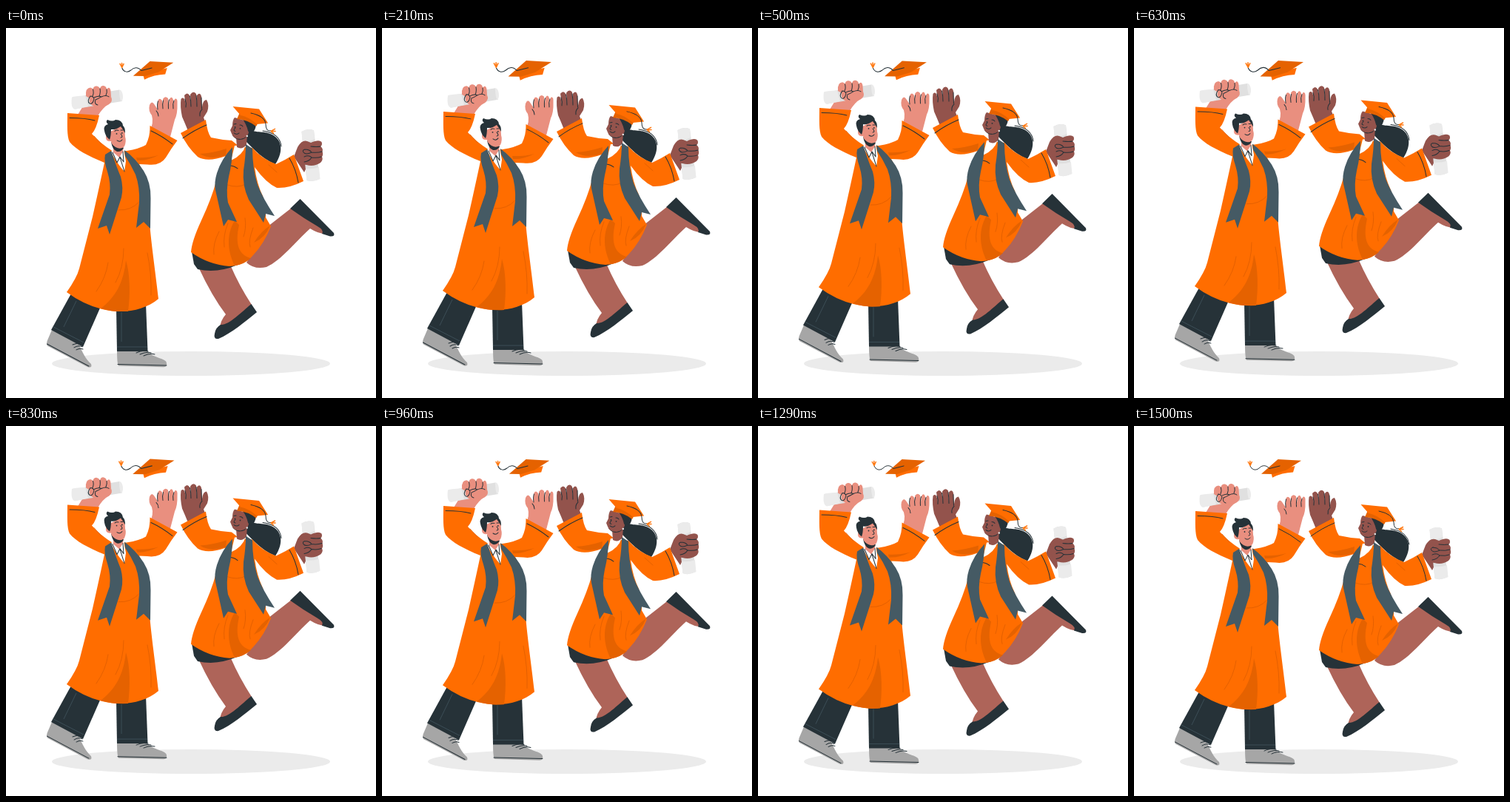
An HTML page that plays this animation: 500x500 px, repeating every 1.54 s.

```html
<!DOCTYPE html>
<html lang="en">
<head>
<meta charset="utf-8">
<title>Graduation high five</title>
<style>
html, body { margin: 0; width: 100%; height: 100%; overflow: hidden; background: #fff; }
svg { display: block; width: 100vw; height: 100vh; }
.o { fill: #ff6d00; }
.d { fill: #e56200; }
.s { fill: #455a64; }
.k { fill: #263238; }
.g { fill: #a6a6a6; }
.p { fill: #e0e0e0; }
.q { fill: #ebebeb; }
.w { fill: #fff; }
.m { fill: #e98f7f; }
.b { fill: #ae6459; }
.h { fill: #93534c; }
.line { fill: none; stroke: #263238; stroke-width: 1; stroke-linecap: round; stroke-linejoin: round; }
.fold { fill: none; stroke: #dd5e00; stroke-width: .8; stroke-linecap: round; }
.seam { fill: none; stroke: #455a64; stroke-width: .7; }
.tassel { fill: none; stroke: #ff7a14; stroke-width: 1.5; stroke-linecap: round; }
</style>
</head>
<body>
<svg viewBox="0 0 500 500">
  <ellipse class="q" cx="250" cy="453.5" rx="188" ry="16.6"/>

  <g id="cap">
    <path class="o" d="M185 62L187 69.7Q200 63 215 62.5L217.5 54Z"/>
    <path class="d" d="M172 64.8L194.5 45L226 46.8L206 59.5L188 65Z"/>
    <path class="line" d="M197 54L183 57.5C178 52 173 53 169 57C164 61 159 59 157 54"/>
    <path class="tassel" d="M157 53.5L154.3 48.5M157 53.5L156.8 47.5M157 53.5L159.3 48.5"/>
  </g>

  <g id="people">
    <g id="man">
      <path class="g" d="M62 408L98 426C103 438 108 448 115 454Q117 460 110 458L56 429.5Q54 427 56 422Z"/>
      <path class="g" d="M150 435L189 435C197 445 213 446 216.500 451Q219 458 213 458.200L152 456.500Q150 454 150 435Z"/>
      <path class="line" stroke-width=".6" d="M55.500 427L112 457M151 454.500L217 456"/>
      <path class="line" d="M90 428Q97 425 101 427M92 432Q98 428 103 431M95 435Q100 432 104 434M176 439Q184 435 192 437M181 441Q190 437 196 439M186 443Q194 439 201 441"/>
      <path class="k" d="M88 359L129 374L104 431L61 408Z"/>
      <path class="k" d="M149 378L189 372L191.500 437L150 437Z"/>
      <path class="seam" d="M64 404L105 425M95 369L78 404M150 431L191 431M156 384L156 424"/>

      <path class="m" d="M97 117L107 101L112 94L140 92Q146 98 139 103Q131 107 124 119Z"/>
      <path class="p" d="M90 94L153 83.500L157 99L93 109.500Z"/>
      <path class="q" d="M89 93.500Q92 92 107 91.500L111 106L93 110Q87 108 89 93.500Z"/>
      <path class="q" d="M153 83.500C158 83 160 97 155.500 99.300Q153 94 153 83.500Z"/>
      <path class="m" d="M108 92Q107 81 114 80.500Q117 81 117.500 83Q118 78 123 78.500Q126 79 127 82Q128 77.500 132 78Q136 79 136 83Q140 78 141.500 85L142 93Q145 99 139 103Q128 108 119 106Q111 102 113 95Z"/>
      <path class="line" d="M117.500 83Q119 88 117 92M127 82Q128 88 126 92M136 83Q137 87 135 91M114 92Q109 99 113 102Q117 104 119 96Q118 92 114 92M119 94Q125 91 129 93Q124 96 121 97M121 97Q119 103 124 104M129 93Q135 90 139 93"/>

      <path class="m" d="M194 140Q200 128 197 118Q192 112 194 104Q197 97 201 104L205 110L205 99Q207 93 211 98L212 104L212 96Q215 91 219 95L220 104L221 96Q224 91 226 97L226 104L228 96Q232 94 231.500 102Q232 116 228 124L222 147Z"/>
      <path class="line" d="M205 110Q204 103 205.500 99M212 109Q211 103 212.500 98M219.500 109Q219 101 220.500 97M226 109Q225 103 227 98M203 112Q206 115 206 119"/>

      <path class="o" d="M83 115L126 118Q122 137 116 143Q126 155 145 167L163 166Q181 163 189 158Q195 146 194.500 132L231.500 152Q223 163 216 175Q208 187 191 184.500L180 184C192 205 193 232 194 262C196 290 202 330 206 366C187 382 157 387 130 380Q105 374 82 357Q96 337 99 325L117 255Q126 215 133 182C111 173 94 164 86 154C82 146 83 130 83 115Z"/>
      <path class="d" d="M162 314C168 333 168 362 165 383Q144 384 128 379C148 364 159 344 162 314Z"/>
      <path class="d" d="M176 175Q190 176 206 172Q190 180 177 179Z"/>
      <path class="line" d="M86 121.500Q107 121.500 120 125M196 139Q211 146 225 157"/>
      <path class="fold" d="M138 317Q135 338 122 356M159 298Q159 324 148 344M191 304Q197 333 196 361M152 246Q169 247 180 235M119 146L129 157"/>

      <path class="w" d="M143 165L159 164L162 180L160 194Q150 183 142 168Z"/>
      <path class="m" d="M145 152L159 158L158 167L153 175L145 168Z"/>
      <path class="line" d="M144 168L150 182L154 174L159 181L158 167M154 175L160 194" stroke-width=".8"/>
      <path class="k" d="M142 154L159 162Q156 168 150 167Q144 165 142 154Z"/>
      <path class="m" d="M138 142L157 131Q161 137 161 147Q163 153 160 160Q155 165 148 161Q142 157 142 153Q135 154 135 148Q135 144 138 142Z"/>
      <path class="k" d="M140 151Q134 146 133 139Q131 132 138 130Q134 127 137 124Q144 127 148 124Q157 124 158 132Q161 134 161 142Q158 137 155 133Q148 138 142 137Q142 146 140 151Z"/>
      <circle class="k" cx="149.500" cy="143" r=".9"/><circle class="k" cx="156.800" cy="142" r=".9"/>
      <path class="line" stroke-width=".8" d="M147 139.500Q149 137.500 152 138.500M155 138L158 138M155 143Q159 148 155 148M150 152Q154 155 157 151M137 147Q139 147 139.500 149"/>

      <path class="s" d="M142 166L134 171Q132 180 137 194Q142 210 140 225L124 271L136 267L140 279L156 229Q159 216 155 201Q149 187 143 168Z"/>
      <path class="s" d="M160 165Q175 176 186 193Q196 209 195.500 230L195 271L186 262L176 270L180 236Q181 215 175 198Q169 185 161 173Z"/>
    </g>

    <g id="woman">
      <path class="b" d="M260 323L303 320Q315 348 332 374Q310 397 289 405Q290 395 297 387Q278 362 260 323Z"/>
      <path class="k" d="M331.500 373L339 384C324 396 304 413 287 420Q280 421 282 413Q283 405 290 401C301 402 318 384 331.500 373Z"/>
      <path class="b" d="M354 268L386 243L399 243L430 272L431 278Q422 278 411 271C392 288 372 314 352 323Q336 327 325 317Z"/>
      <path class="k" d="M397.500 231L443 277Q445 282 438 281.500L427 278Q430 273 421 268Q402 257 384 244Z"/>
      <path class="k" d="M251 302L254 319L259 326Q285 332 313 320Z"/>

      <path class="k" d="M325 132C333 144 345 138 357 143C373 149 376 166 364 184Q349 178 335 164L321 150Z"/>
      <path class="line" d="M347 139Q370 142 372 160"/>

      <path class="h" d="M246 139Q242 129 238 120Q235 106 236.500 96Q240 92 242 99L243 105L241 91Q245 86 248 91L250 103L249 90Q253 84 257 89L258 103L258 91Q262 86 264 92L265 107Q266 97 271 97Q275 104 272 113L267 121L270 129Z"/>
      <path class="line" d="M243 107Q244 102 242 96M250 106Q250 98 248.500 92M258 106Q258 98 257 91M264.500 109Q264 102 264 94M265 110Q261 114 262 119"/>

      <path class="h" d="M389 174L394 161Q399 153 408 153L412 176L403 195Z"/>
      <path class="p" d="M399.500 140Q408 135 416 138.500L424 204Q414 209 406.500 206Z"/>
      <path class="q" d="M399.500 140Q408 135 416 138.500L417 150Q408 155 400.500 153ZM405 190Q415 191 423 188L424.500 204Q414 209 406.500 206Z"/>
      <path class="h" d="M395 160Q400 151 407 153L412 155Q423 150 426.500 154Q428 158 425 160Q429 163 427.500 167Q429 171 427 174Q429 178 425 182Q416 188 406 185L398 184Z"/>
      <path class="line" d="M412 160Q420 161 425 160M413 168Q421 169 427 167M413 175Q421 176 426 174M404 164Q410 164 413 168Q405 172 402 168Q400 165 404 164M403 174Q409 171 413 175Q410 180 403 181"/>

      <path class="o" d="M236 142L270 124Q272 141 277 148Q290 151 305 152L315 160L333 162Q346 177 365 184Q378 178 389 171L402 207Q382 217 366 216Q351 209 336 188Q339 211 347 227Q352 244 351 256L358 268Q349 291 334 307Q322 321 302 322Q274 320 250 303Q251 288 264 260Q278 230 284 207L297 173Q272 182 259 174Q245 161 236 142Z"/>
      <path class="d" d="M309 260C296 282 301 305 309 321Q321 320 331 311C315 307 309 293 315 266Z"/>
      <path class="d" d="M357 267Q345 274 335 290Q350 284 357 267Z"/>
      <path class="d" d="M262 170Q279 169 298 163L297 172Q276 179 262 170Z"/>
      <path class="line" d="M239 149Q254 138 271 131M383 176Q392 191 395 209"/>
      <path class="fold" d="M299 212Q313 217 324 211M288 275Q279 292 281 306M300 264Q293 280 295 296M323 257Q325 271 321 282M334 270Q327 288 330 296M355 185L366 195"/>
      <path class="line" stroke-width=".7" d="M302 186Q308 186 313 190"/>

      <path class="w" d="M309 159L324 158Q320 172 304 179Z"/>
      <path class="h" d="M311 148L326 143L325 158Q319 165 312 161Z"/>
      <path class="k" d="M306 145L326 143Q325 151 315 151Q309 150 306 145Z"/>
      <path class="h" d="M309 121L326 126L328 141Q327 148 317 150Q307 150 305 143L303 138L306 132Q306 124 309 121Z"/>
      <path class="k" d="M319 122L338 130Q337 140 331 143Q328 142 327 139Q325 130 319 122Z"/>
      <circle class="q" cx="325.800" cy="146" r="1.200"/>
      <circle class="k" cx="309.500" cy="134" r=".9"/><circle class="k" cx="316.500" cy="136" r=".9"/>
      <path class="line" stroke-width=".8" d="M308 130L311 129.500M316 131Q319 131 320 133M310 135Q306 139 310 139.500M308 142Q312 145 315 142"/>
      <path class="d" d="M316 114L312 123Q327 124 338 133L342 126Z"/>
      <path class="o" d="M306.500 106L342 109.500L354 128.500L339 130Q328 120 317 118Z"/>
      <path class="line" d="M331 115Q350 119 351 130Q351 140 358 139"/>
      <path class="tassel" d="M358 139.500L363.500 136.500M358 139.500L364 139.500M358 139.500L361.500 142.500"/>

      <path class="s" d="M306 161Q291 177 285 196Q281 209 283 219L294 268L300 259L312 262L300 236Q297 220 301 201Q306 181 306 161Z"/>
      <path class="s" d="M324 157L333 163Q333 190 340 212Q347 230 363 254L351 251L348 263L328 232Q319 213 321 192Q324 173 324 157Z"/>
    </g>
  </g>
</svg>
<script>
const LOOP = 1540, LEAD = 40, RISE = 8.2, STRETCH = .002;
const FLOOR = 460, CAP_X = 190, CAP_Y = 57;
const beats = [[0, 0], [.14, 1], [.28, .2], [.42, 1], [.7, 0], [1, 0]];
const cap = document.getElementById("cap");
const people = document.getElementById("people");

const ease = x => x * x * (3 - 2 * x);

function pulse(p) {
  const i = beats.findIndex(b => b[0] > p);
  const [x0, y0] = beats[i - 1], [x1, y1] = beats[i];
  return y0 + (y1 - y0) * ease((p - x0) / (x1 - x0));
}

function draw(ms) {
  const p = ((ms + LEAD) % LOOP) / LOOP;
  const up = (1 - Math.cos(p * 2 * Math.PI)) / 2;
  const size = 1 + .085 * pulse(p);
  people.setAttribute("transform",
    `translate(0 ${FLOOR - RISE * up}) scale(1 ${1 + STRETCH * up}) translate(0 ${-FLOOR})`);
  cap.setAttribute("transform",
    `translate(${CAP_X} ${CAP_Y}) scale(${size}) translate(${-CAP_X} ${-CAP_Y})`);
}

let start;
function tick(now) {
  start ??= now;
  draw(now - start);
  requestAnimationFrame(tick);
}
draw(0);
requestAnimationFrame(tick);
</script>
</body>
</html>
```
